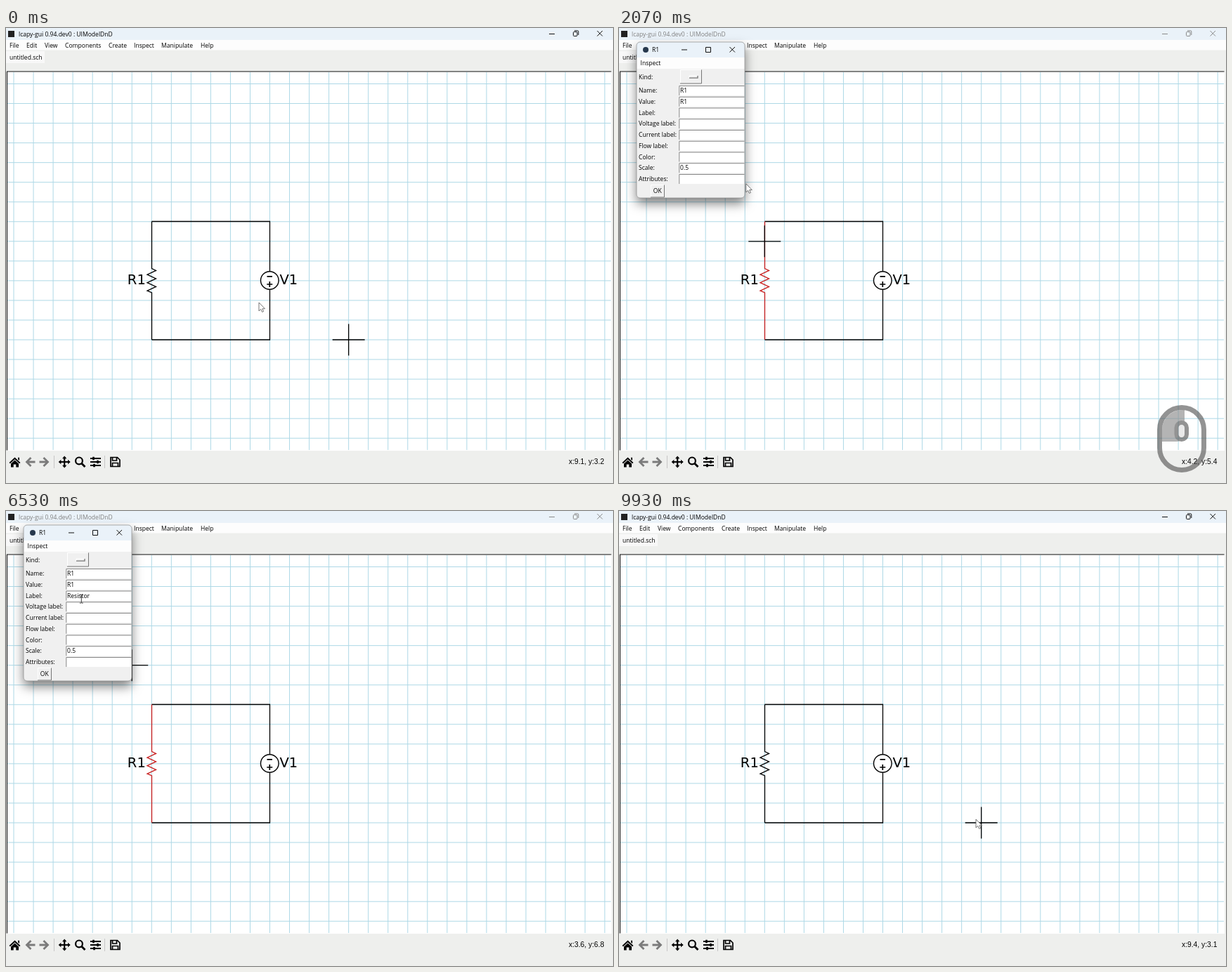
These frames come from a looping animation (864x648 px, 10000 ms). An HTML page:

```html
<!DOCTYPE html>
<html lang="en">
<head>
<meta charset="utf-8">
<title>Circuit editor</title>
<style>
  html, body { margin: 0; width: 100%; height: 100%; overflow: hidden; background: #fff; }
  svg { display: block; width: 864px; height: 648px; font: 8.55px "Open Sans", "Noto Sans", sans-serif; }
  .schematic { font: 19.5px "DejaVu Sans", sans-serif; }
  .coords { font: 10.3px "Liberation Sans", Arial, sans-serif; }
  text { white-space: pre; }
</style>
</head>
<body>
<svg id="stage" viewBox="0 0 864 648" xmlns="http://www.w3.org/2000/svg"></svg>
<script>
const LOOP = 10000, GRID = 28.04, GRID_X = 11, GRID_Y = 79.5;
const RED = '#c81e1e';

const rect = (x, y, w, h, fill, extra = '') =>
  `<rect x="${x}" y="${y}" width="${w}" height="${h}" fill="${fill}" ${extra}/>`;
const text = (x, y, s, extra = '') => `<text x="${x}" y="${y}" ${extra}>${s}</text>`;
const path = (d, stroke = '#000', width = 1, extra = '') =>
  `<path d="${d}" fill="none" stroke="${stroke}" stroke-width="${width}" ${extra}/>`;
const range = n => [...Array(n).keys()];

function grid() {
  const columns = range(31).map(i => `M${GRID_X + GRID * i} 63V601`);
  const rows = range(19).map(i => `M2 ${GRID_Y + GRID * i}H861`);
  return path(columns.concat(rows).join(''), '#add8e6');
}

function windowFrame() {
  const menus = [[5, 'File'], [29, 'Edit'], [55, 'View'], [84, 'Components'], [146, 'Create'],
    [182, 'Inspect'], [221, 'Manipulate'], [277, 'Help']];
  return rect(0, 0, 864, 648, '#eeefed') + rect(0, 0, 864, 17, '#eaf2f9') +
    rect(0, 17, 864, 14.5, '#fdfdfd') + rect(0, 33, 55, 17, '#f8f8f8') +
    rect(3, 4, 9, 9, '#222') +
    `<g id="titleText">${text(18, 12, 'lcapy-gui 0.94.dev0 : UIModelDnD')}</g>` +
    `<g id="titleButtons" fill="none" stroke="#111">
      <path d="M773 8.5H781M841.5 4L849 11.5M849 4L841.5 11.5"/>
      <rect x="807.5" y="5.5" width="5.5" height="6" rx="1"/><path d="M809 3.8H813.5Q814.8 3.8 814.8 5V10"/></g>` +
    menus.map(([x, s]) => text(x, 27.5, s)).join('') + text(5, 44.5, 'untitled.sch') +
    rect(1, 62, 861, 540, '#fff') + grid() + path('M1.5 601.5V62H861.5', '#111', 1.1);
}

function toolbar() {
  const arrow = 'M-7 0L0 -7L2 -5L-1.7 -1.5H7V1.5H-1.7L2 5L0 7Z';
  return `<path d="M12.5 611.5L20.5 619L19 620.3L12.5 614.3L6 620.3L4.5 619L9 614.8ZM17 611.8H19V616L17 614.2ZM12.5 615.6L18 620.6V625.5H14.3V621.5H10.7V625.5H7V620.6Z"/>
    <path d="${arrow}" transform="translate(34.5 618)" fill="#7b7b7b"/>
    <path d="${arrow}" transform="translate(54.5 618) scale(-1 1)" fill="#7b7b7b"/>
    ${path('M68.5 609V627M140.5 609V627', '#c6c6c6')}
    ${path('M76 618H90.500M83.200 611V625', '#000', 2.2)}
    <path d="${range(4).map(i => 'M83.2 609.500L80 613.200H86.400Z').slice(0, 1)}M83.200 626.500L80 622.800H86.400ZM74.700 618L78.400 614.800V621.200ZM91.700 618L88 614.800V621.200Z"/>
    <circle cx="104" cy="616.400" r="4.900" fill="none" stroke="#000" stroke-width="2.200"/>
    ${path('M107.500 620L112.500 625', '#000', 2.800)}
    ${path('M120 613H135M120 618H135M120 623H135', '#000', 1.800)}
    ${path('M124.500 610.800V615.200M130.500 615.800V620.200M125.500 620.800V625.200', '#000', 2.600)}
    ${path('M149 611.500H158.500L162 615V624.500H149ZM151.500 611.500V616H157.500V611.500M151.500 624.500V619.500H159.500V624.500', '#000', 1.700)}`;
}

function circuit() {
  const teeth = range(6).map(i => `L${i % 2 ? 201 : 213.5} ${345.4 + 5.75 * i}`).join('');
  return path('M207.5 275.5H375.5V346.500M375.5 372.500V444H207.5', '#000', 1.3) +
    path(`M207.5 275.5V342.600${teeth}L207.5 377V444`, '#000', 1.3, 'id="resistor"') +
    '<circle cx="375.3" cy="359.5" r="12.8" fill="#fff" stroke="#000" stroke-width="1.4"/>' +
    path('M371.500 353.800H379M371.300 365H379.300M375.300 361V369', '#000', 1.7) +
    `<g class="schematic">${text(198.8, 364.5, 'R1', 'id="partLabel" text-anchor="end"')}${text(389.5, 364.5, 'V1')}</g>`;
}

function contextMenu() {
  const items = [['Cut', 'Ctrl+x'], ['Copy', 'Ctrl+c'], ['Paste', 'Ctrl+v'], ['Delete', 'Del'],
    ['Inspect', ''], ['Properties', '']];
  return `<g id="menu">${rect(211, 363, 105, 90, '#000', 'opacity=".35"')}
    ${rect(209.5, 361.5, 104.5, 89, '#f1f1f1', 'stroke="#a0a0a0"')}
    ${rect(211, 0, 101, 14.2, '#0078d7', 'id="hover"')}` +
    items.map(([name, key], i) => `<g class="item">${text(226, 373.6 + 14.2 * i, name)}${text(274, 373.6 + 14.2 * i, key)}</g>`).join('') +
    '<path d="M303.700 424.200L307.200 427L303.700 429.800Z"/></g>';
}

function dialog() {
  const rows = [['Name:', 'R1'], ['Value:', 'R1'], ['Label:', ''], ['Voltage label:', ''], ['Current label:', ''],
    ['Flow label:', ''], ['Color:', ''], ['Scale:', '0.5'], ['Attributes:', '']];
  const fields = rows.map(([name, value], i) => {
    const y = 89 + 15.75 * i;
    return text(28, y + 3.1, name) + rect(85.5, y - 6.500, 93, 13.5, '#fff') +
      path(`M85.800 ${y + 7}V${y - 6.500}H178.500`, '#858585') +
      text(87, y + 3.1, value, name === 'Label:' ? 'id="entry"' : '');
  }).join('');
  return `<g id="dialog"><g filter="url(#shadow)">${rect(25, 20, 154, 222, '#f0f0f0', 'rx="5"')}</g>
    <path d="M25 42V25Q25 20 30 20H174Q179 20 179 25V42Z" fill="#eaf2f9"/>
    ${rect(25, 42, 154, 16, '#fdfdfd')}<circle cx="38" cy="31" r="4" fill="#26384d"/>
    ${text(47, 34.300, 'R1')}
    ${path('M89 31H97M123.500 27.500H130.500V34.500H123.500ZM157.500 27L165 34.500M165 27L157.500 34.500', '#111')}
    ${text(30.500, 53.300, 'Inspect')}${text(28, 72.800, 'Kind:')}
    ${path('M87.500 79V59.500H117', '#fff')}${path('M87 79H117.500V59.500', '#777')}
    ${path('M100 71.200V68H112', '#fff')}${path('M100 71.200H112V68', '#777', 1.3)}
    ${fields}
    ${path('M45.500 241V223.500H65', '#fff', 1, 'id="okLight"')}${path('M45 241H64.500V223.500', '#777', 1, 'id="okDark"')}
    ${text(48.800, 235.200, 'OK', 'id="okText"')}
    ${rect(0, 115, 1.1, 11, '#000', 'id="caret"')}
    ${rect(25, 20, 154, 222, 'none', 'rx="5" stroke="#8c8c8c" stroke-width=".7"')}</g>`;
}

function mouseOverlay() {
  return `<g id="mouse"><path id="mouseButton" d="M801 544A28 28 0 0 1 829 572V589H809Q797 589 797 577V544Z" fill="#8a8a8a"/>
    <rect x="769.5" y="540.5" width="63" height="89" rx="31.500" fill="none" stroke="#555" stroke-width="7"/>
    <rect x="793.500" y="562" width="14.500" height="24" rx="7.200" fill="#ddd" stroke="#555" stroke-width="6"/></g>`;
}

const stage = document.getElementById('stage');
stage.innerHTML = `<defs><filter id="shadow" x="-30%" y="-20%" width="160%" height="150%">
    <feDropShadow dx="0" dy="8" stdDeviation="8" flood-color="#000" flood-opacity=".5"/></filter></defs>` +
  windowFrame() + toolbar() + circuit() + path('M-23 0H23M0 -22.500V22.500', '#000', 1.3, 'id="cross"') +
  text(801, 621.300, '', 'id="coords" class="coords"') + contextMenu() + dialog() + mouseOverlay() +
  `<path id="arrow" d="M0 0V12L2.800 9.500L4.600 13.500L6.600 12.700L4.900 8.800H8.500Z" fill="#fff" stroke="#555" stroke-width=".8"/>` +
  path('M-2.500 -6H-.600L0 -5.500L.600 -6H2.500M0 -5.500V5.500M-2.500 6H-.600L0 5.500L.600 6H2.500', '#333', .9, 'id="beam"');

const ui = Object.fromEntries([...stage.querySelectorAll('[id]')].map(e => [e.id, e]));
const items = [...stage.querySelectorAll('.item')];

// [time, x, y]
const pointerKeys = [[0, 360, 391], [330, 209, 361], [660, 209, 361], [1066, 239, 399], [1400, 244, 440],
  [1600, 240, 435], [2066, 181, 222], [2330, 100, 152], [2450, 100, 152], [2600, 107, 139], [2780, 107, 139],
  [3000, 111, 115], [3660, 111, 115], [3730, 112, 115], [6500, 112, 115], [6900, 56, 236], [7200, 56, 236],
  [7530, 277, 246], [9390, 277, 246], [9395, 56, 236], [9530, 280, 330], [9610, 280, 330], [9932, 511, 440], [10000, 360, 391]];
// Position last reported to the canvas, which trails the pointer.
const probeKeys = [[0, 495, 434], [330, 209, 361], [1530, 209, 361], [1900, 220, 311], [2070, 220, 311],
  [2200, 187, 232], [7220, 187, 232], [7530, 265, 210], [9390, 265, 210], [9395, 187, 232], [9530, 280, 330],
  [9610, 280, 330], [9932, 511, 440], [10000, 495, 434]];
// [shown, fade start, fade end, right button]
const clicks = [[595, 1070, 1470, true], [1465, 1930, 2330, false], [6795, 7200, 7600, false]];
const typing = [3395, 3725, 4125, 4460, 4525, 4725, 4925, 5395];

const clamp = v => Math.max(0, Math.min(1, v));
const within = (t, a, b) => t >= a && t < b;
const show = (el, on) => el.setAttribute('visibility', on ? 'visible' : 'hidden');
const move = (el, x, y) => el.setAttribute('transform', `translate(${x} ${y})`);
const snap = (v, origin) => origin + GRID * Math.round((v - origin) / GRID);

function sample(keys, t) {
  const i = Math.max(1, keys.findIndex(k => k[0] >= t));
  const [a, b] = [keys[i - 1], keys[i]];
  const p = clamp((t - a[0]) / (b[0] - a[0]));
  return [a[1] + (b[1] - a[1]) * p, a[2] + (b[2] - a[2]) * p];
}

function dialogOpacity(t) {
  if (within(t, 1595, 7260)) return clamp((t - 1540) / 120);
  if (within(t, 7260, 7400)) return clamp((7400 - t) / 200);
  return within(t, 9395, 9530) ? clamp((9530 - t) / 200) : 0;
}

function render(t) {
  const [x, y] = sample(pointerKeys, t), [px, py] = sample(probeKeys, t);
  const opacity = dialogOpacity(t);
  const inactive = within(t, 1660, 7260);

  ui.titleText.setAttribute('fill', inactive ? '#808080' : '#000');
  ui.titleButtons.setAttribute('stroke', inactive ? '#8a8a8a' : '#111');
  ui.resistor.setAttribute('stroke', within(t, 595, 7390) || within(t, 9395, 9660) ? RED : '#000');
  ui.partLabel.textContent = within(t, 7260, 9395) ? 'Resistor' : 'R1';
  ui.coords.textContent = `x:${((px + 15) / 56).toFixed(1)}, y:${((613 - py) / 56).toFixed(1)}`;
  move(ui.cross, snap(px, GRID_X), snap(py, GRID_Y));
  show(ui.cross, !within(t, 595, 1595));

  show(ui.menu, within(t, 660, 1530));
  const row = Math.floor((y - 363) / 14.2);
  const hovering = row >= 0 && row < items.length && x > 211;
  ui.hover.setAttribute('y', 363.2 + 14.2 * row);
  ui.hover.setAttribute('opacity', hovering ? 1 : 0);
  items.forEach((item, i) => item.setAttribute('fill', hovering && i === row ? '#fff' : '#000'));

  show(ui.dialog, opacity > 0);
  ui.dialog.setAttribute('opacity', opacity);
  ui.entry.textContent = t > 9000 ? '' : 'Resistor'.slice(0, typing.filter(k => t >= k).length);
  const caretOn = within(t, 2995, 7400) && ((t - 3000) % 900 < 599 || t > 6600);
  ui.caret.setAttribute('x', 87 + ui.entry.getComputedTextLength());
  ui.caret.setAttribute('opacity', caretOn ? 1 : 0);
  const pressed = within(t, 7060, 7260);
  ui.okLight.setAttribute('stroke', pressed ? '#777' : '#fff');
  ui.okDark.setAttribute('stroke', pressed ? '#fff' : '#777');
  move(ui.okText, +pressed, +pressed);

  const click = clicks.find(c => within(t, c[0], c[2] - 5));
  show(ui.mouse, click);
  if (click) {
    ui.mouse.setAttribute('opacity', .96 * clamp((click[2] - t) / (click[2] - click[1])));
    ui.mouseButton.setAttribute('transform', click[3] ? '' : 'matrix(-1 0 0 1 1602 0)');
  }

  const overField = inactive && within(x, 86, 178) && within(y, 82, 222);
  show(ui.beam, overField);
  show(ui.arrow, !overField);
  move(overField ? ui.beam : ui.arrow, x, y);
}

function tick() {
  const step = Math.floor((performance.now() % LOOP + 5) * .015) % 150;
  render(step / .015);
  requestAnimationFrame(tick);
}
tick();
</script>
</body>
</html>
```
